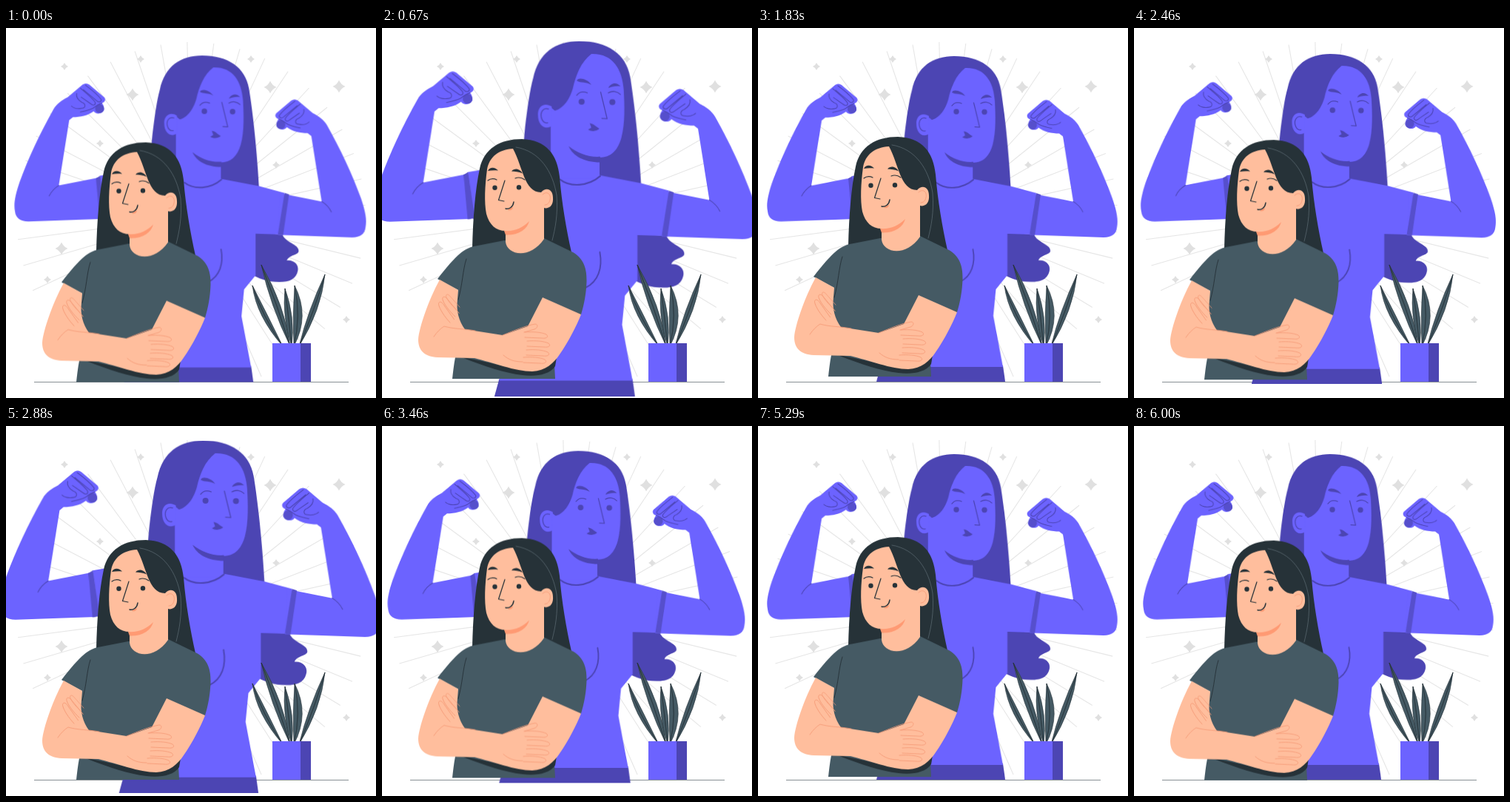
An HTML page that plays this animation: 500 px wide and 500 px high, repeating every 6040 ms.

```html
<!DOCTYPE html>
<html lang="en">
<head>
<meta charset="utf-8">
<title>Inner strength</title>
<style>
  html, body { margin: 0; width: 100%; height: 100%; overflow: hidden; background: #fff; }
  svg { display: block; width: 100%; height: 100%; }

  .hero { transform-origin: 249px 258px; animation: beat 6040ms -20ms linear infinite; }
  .girl { animation: lift 6040ms -20ms linear infinite; }
  /* beats peak at 0.6 s and 3 s; the lift has a 3 s period */
  @keyframes beat {
    0%, 29.801%, 39.735%, 59.603%, 100% { transform: scale(1); }
    9.934%, 49.669% { transform: scale(1.1); }
  }
  @keyframes lift {
    0%, 49.669%, 99.338%, 100% { transform: translateY(.7px); }
    24.834%, 74.503% { transform: translateY(-9.3px); }
  }

  .violet { fill: #6c63ff; }
  .shade { fill: #4c45b3; }
  .band { fill: #564fcc; }
  .ink { fill: #263238; }
  .slate { fill: #455a64; }
  .skin { fill: #ffbe9d; }
  .blush { fill: #ff9a73; }
  .line { fill: none; stroke-linecap: round; stroke-linejoin: round; }
  .shadeLine { stroke: #4c45b3; }
  .inkLine { stroke: #263238; }
  .skinLine { stroke: #f59a76; stroke-width: .8; }
</style>
</head>
<body>
<svg viewBox="0 0 500 500">
  <defs>
    <path id="finger" d="M0 0C11-1 23 0 29 3C33 6 29 9 23 8L0 7"/>
    <g id="arm">
      <path class="violet" d="M128 202L72 213L86 125L91 121C101 121 111 119 119 113C121 117 130 118 133 111C133 107 132 104 130 102C134 101 136 97 133 94L113 77C110 75 107 75 104 77L84 94C76 98 69 103 65 110C47 142 31 176 19 209C13 227 11 238 13 248C14 257 20 261 31 261.500L131 258Z"/>
      <circle class="band" cx="127" cy="109.500" r="6"/>
      <path class="line shadeLine" d="M72 213C67 216 62 221 59 227M108 78C116 84 124 90 129 97C130 100 126 102 123 99L105 84M101 82C108 88 117 95 121 101C122 105 118 106 115 103L102 94M96 89C95 94 98 98 103 101C109 103 108 109 103 109C98 110 92 109 89 106M130 102C126 103 122 106 118 109C112 112 106 113 101 114"/>
    </g>
  </defs>

  <g id="rays" stroke="#e6e6e6" stroke-width="1.1"></g>
  <g id="stars" fill="#e0e0e0"></g>
  <path d="M38 478.5H463" stroke="#7b8488" stroke-width=".9"/>

  <g class="hero">
    <!-- hair behind -->
    <path class="shade" d="M192 240C194 200 196 165 198 145C201 120 204 98 208 84C215 52 236 38 265 38C300 38 323 54 328 82C333 112 339 165 342 222L300 240Z"/>
    <path class="shade" d="M330 276L373 279C377 290 395 292 395 301C395 307 382 306 379 314C389 313 395 320 394 327C392 339 383 343 369 343C352 343 341 338 330 332Z"/>
    <!-- trousers, shirt and neck -->
    <path class="shade" d="M166 456H331L334 478H160Z"/>
    <path class="violet" d="M230 120V183L127 200L134 258L160 290L185 380L166 458H331L318 389L321.500 353L337 334V278L368 279L376 223L342 214L290 204V170Z"/>
    <use href="#arm"/>
    <use href="#arm" transform="translate(498 21.5) scale(-1 1)"/>
    <path class="band" d="M122 203.500L127.500 200L136 257L127 258.500ZM376 223L382 225L374 280L367 279Z"/>
    <!-- head -->
    <path class="violet" d="M280 54C306 53 318 72 320 98C321 117 322 140 317 158C312 175 303 182 290 182V208L230 208V125C241 124 251 116 257 97C261 80 267 64 280 54Z"/>
    <path class="violet" d="M231 119C222 113 213 119 214 130C214 141 222 149 231 143Z"/>
    <path class="shade" d="M252 168C263 177 277 182 291 181V188C271 188 257 180 252 168Z"/>
    <path class="shade" d="M262 87C263 82 275 84 280 92C274 88 267 90 262 87ZM301 96C304 90 311 88 316 94C311 93 306 94 301 96Z"/>
    <circle class="shade" cx="268" cy="113" r="3.700"/>
    <circle class="shade" cx="306" cy="113.500" r="3.700"/>
    <path class="shade" d="M278 139.500C282 140 284 142 285 143L290 146.500C286 150 280 150 276 147.500L280 145Z"/>
    <g class="line shadeLine" stroke-width="1.200">
      <path d="M262 105C265 101 270 100 275 102M301 102C306 99 312 100 316 104"/>
      <path d="M291.500 101L299.500 134L293 133.500"/>
      <path d="M227 122C220 120 217 126 218 132C219 137 222 140 226 139"/>
      <path d="M241 209C254 219 276 218 291 205" stroke-width="2"/>
      <path d="M290.500 299C294 318 289 335 273 343" stroke-width="1.800"/>
    </g>
  </g>

  <g id="leaves" class="slate" stroke="#263238" stroke-width=".6"></g>
  <path class="violet" d="M360 426H399V478H360Z"/>
  <path class="shade" d="M398 426H412V478H398Z"/>

  <g class="girl">
    <path class="ink" d="M122 302C123 260 126 222 132 194C138 167 159 154 189 154C222 155 237 175 240 205C243 241 249 275 256 307L218 320H140Z"/>
    <!-- shirt -->
    <path class="slate" d="M165 291L124 299C112 302 102 308 75 343L103 358L95 375L100 410L99 449C97 459 96 469 95 478H234L232 440L269 391C273 378 276 363 276.500 346C277 325 270 313 256 306L219 288Z"/>
    <!-- head -->
    <path class="skin" d="M177 167C158 168 145 178 142 195C139 217 138 239 141 255C145 270 154 278 167 278V293C169 311 200 317 219 289V247C226 249 232 243 231 233C231 222 222 218 215 226C192 226 190 190 177 167Z"/>
    <path class="blush" d="M165 278C179 279 190 274 199 265C196 276 185 284 167 283.500Z"/>
    <path class="ink" d="M143 197C146 191 153 192 157 196.500C152 196 148 196 143 197ZM175 197.500C180 192 187 195 190 200.500C185 198 180 198 175 197.500Z"/>
    <circle class="ink" cx="152.500" cy="219.700" r="3.200"/>
    <circle class="ink" cx="185" cy="219.200" r="3.200"/>
    <path class="blush" d="M170 250C174 251 177 249 177 246C174 247 172 248 170 250Z"/>
    <g class="line inkLine" stroke-width="1.200">
      <path d="M143 210C147 207 151 207 155 209M180 207C185 205 189 206 193 209"/>
      <path d="M166 210L157.500 236.500L165 238"/>
      <path d="M167 248C172 249 177 246 178 239" stroke-width="1.500"/>
    </g>
    <path class="line skinLine" d="M217 229C223 223 229 229 227 236C226 241 223 243 220 243"/>
    <path class="line" d="M181 165C213 170 231 198 236 230C238 256 234 275 230 291" stroke="#6b7a82" stroke-width=".6"/>
    <!-- folded arms -->
    <path class="ink" d="M108 449C152 456 180 467 205 467C222 466 230 456 236 449L234 461C226 473 207 475 190 473C165 470 141 462 108 449Z"/>
    <path class="skin" d="M78 344C63 371 50 409 49 425C49 440 58 448 75 449L125 450C150 456 180 468 203 468C221 467 232 457 240 445C252 428 263 406 269 391L217 368L197 407L163 419L112 411C104 400 100 386 102 371L103 358Z"/>
    <g class="line skinLine">
      <path d="M126 413C110 410 98 411 84 407C79 410 74 415 70 421M163 419C178 413 194 406 207 404C211 404 211 409 206 411L192 415M190 455C178 455 171 452 164 446"/>
      <use href="#finger" x="193" y="415"/>
      <use href="#finger" x="196" y="427"/>
      <use href="#finger" x="195" y="439"/>
      <use href="#finger" x="191" y="449"/>
      <use href="#finger" transform="translate(92 402) rotate(232)"/>
      <use href="#finger" transform="translate(99 394) rotate(228)"/>
      <use href="#finger" transform="translate(101 385) rotate(226) scale(.8)"/>
    </g>
    <path class="line inkLine" stroke-width=".9" d="M114 316C109 331 109 350 103 371"/>
  </g>
</svg>
<script>
  const add = (id, d) => {
    const path = document.createElementNS("http://www.w3.org/2000/svg", "path");
    path.setAttribute("d", d);
    document.getElementById(id).append(path);
  };

  // evenly spread rays that end on one circle
  for (let i = 0; i < 32; i++) {
    const angle = (155 + i * 8.75) * Math.PI / 180;
    const at = r => [250 + r * Math.cos(angle), 255 + r * Math.sin(angle)];
    add("rays", `M${at(85)}L${at(236)}`);
  }

  function star(x, y, r) {
    const k = r * 0.3;
    add("stars", `M${x} ${y - r}Q${x + k} ${y - k} ${x + r} ${y}Q${x + k} ${y + k} ${x} ${y + r}` +
      `Q${x - k} ${y + k} ${x - r} ${y}Q${x - k} ${y - k} ${x} ${y - r}Z`);
  }
  const small = [[79, 52], [182, 42], [127, 156], [56, 340], [331, 42], [365, 185], [460, 394]];
  const large = [[171, 90], [75, 298], [357, 80], [450, 79]];
  small.forEach(([x, y]) => star(x, y, 5));
  large.forEach(([x, y]) => star(x, y, 8.5));

  // a blade bends from its tip to the pot, with a vein down the middle
  function leaf(x, y, bend, base, width) {
    const mid = (y + 430) / 2;
    const side = w => `M${x} ${y}Q${bend + w} ${mid} ${base} 430`;
    add("leaves", `${side(width)}Q${bend - width} ${mid} ${x} ${y}Z${side(0)}Q${bend} ${mid} ${x} ${y}`);
  }
  leaf(333, 348, 346, 374, 8);
  leaf(345, 320, 367, 384, 10);
  leaf(377, 352, 382, 386, 9);
  leaf(390, 348, 399, 389, 12);
  leaf(431, 333, 417, 396, 9);
</script>
</body>
</html>
```
